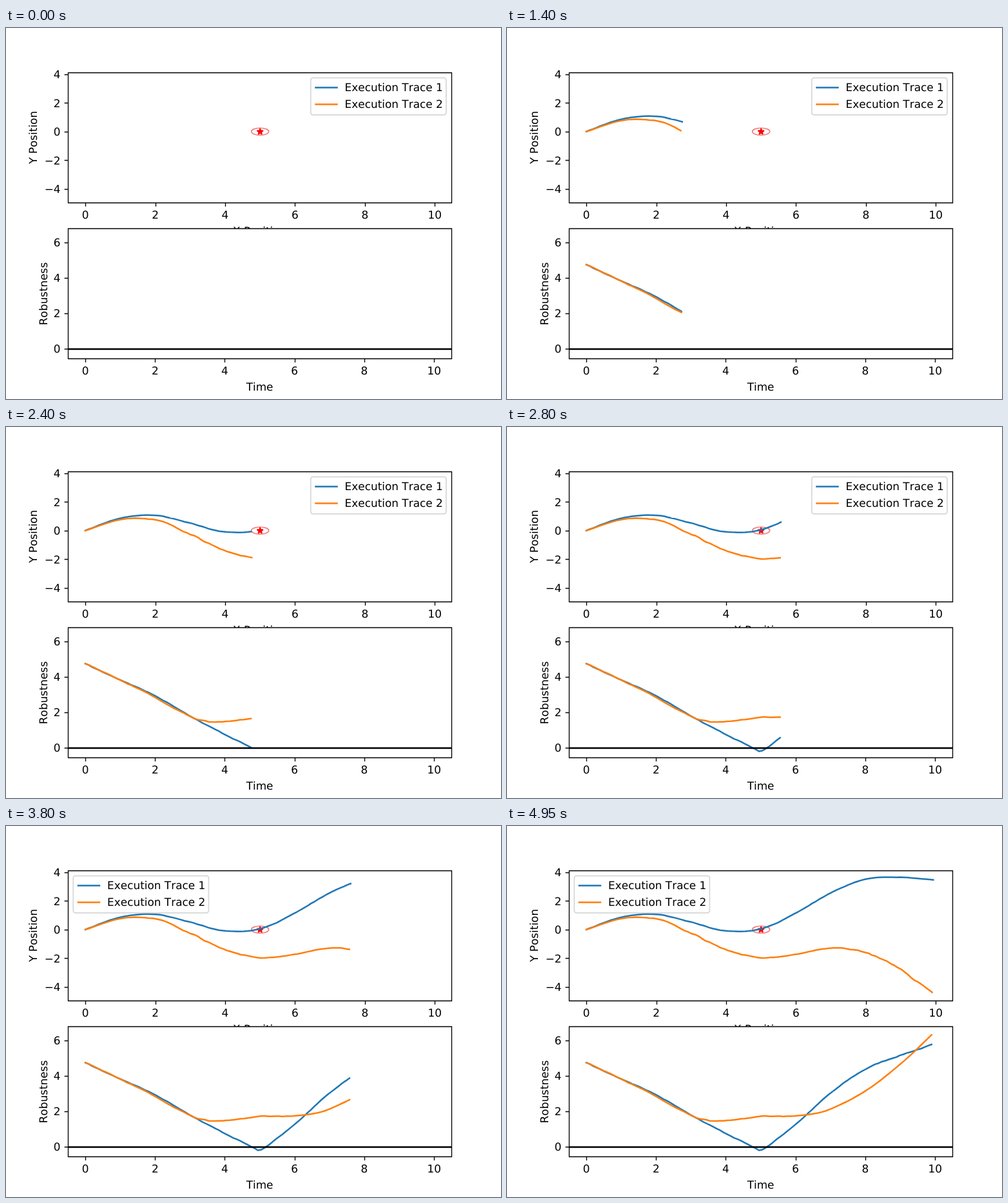
Recreate the animation shown at these times as an HTML page. Size 768 by 576 pixels, loop 5 s.

```html
<!DOCTYPE html>
<html lang="en">
<head>
<meta charset="utf-8">
<title>Execution traces</title>
<style>
html, body { margin: 0; width: 100%; height: 100%; overflow: hidden; background: #fff; }
svg { display: block; width: 768px; height: 576px; }
text {
  font: 16.9px "DejaVu Sans", sans-serif; font-kerning: none;
  fill: #000; text-rendering: geometricPrecision;
}
</style>
</head>
<body>
<svg id="stage" viewBox="0 0 768 576"></svg>
<script>
const NS = "http://www.w3.org/2000/svg";
const stage = document.getElementById("stage");
const COLORS = ["#1f77b4", "#ff7f0e"];
const LOOP = 5000, STEP = 50, COUNT = 99, DT = 10 / COUNT;
const LEFT = 96, RIGHT = 691.2, GOAL_X = 5, GOAL_R = 0.25;
const LEGEND_FLIP = 65;

// Each panel maps data to pixels: origin (x0, y0) and pixels per unit (sx, sy).
const field = { top: 69.12, bottom: 270.72, x0: 123.06, sx: 54.23, y0: 160.8, sy: 22.25 };
const chart = { top: 311.04, bottom: 512.64, x0: 123.05, sx: 54.11, y0: 498, sy: 27.5 };

function seeded(seed) {
  return () => (seed = seed * 16807 % 2147483647) / 2147483647;
}

// Smooth curve through key heights that lie one unit apart.
function spline(keys, x) {
  const last = keys.length - 1;
  const at = i => i < 0 ? 2 * keys[0] - keys[1]
    : i > last ? 2 * keys[last] - keys[last - 1] : keys[i];
  const i = Math.floor(x), u = x - i;
  const a = at(i), b = at(i + 1);
  const ma = (b - at(i - 1)) / 2, mb = (at(i + 2) - a) / 2;
  return a + u * (ma + u * (3 * (b - a) - 2 * ma - mb + u * (2 * (a - b) + ma + mb)));
}

// Robustness is the distance left to the goal's edge.
function makeTrace(keys, wobble, seed) {
  const random = seeded(seed);
  let drift = 0;
  return Array.from({ length: COUNT }, (_, k) => {
    const t = k * DT;
    if (k) drift = drift * 0.6 + (random() - 0.5) * 0.04;
    const x = t + drift;
    const y = spline(keys, t) + drift * wobble;
    return { t, x, y, r: Math.hypot(x - GOAL_X, y) - GOAL_R };
  });
}
const traces = [
  makeTrace([0, 0.86, 1.06, 0.5, -0.09, 0.05, 1.15, 2.58, 3.52, 3.65, 3.44], 0.3, 7),
  makeTrace([0, 0.76, 0.75, -0.22, -1.42, -1.96, -1.73, -1.29, -1.6, -2.84, -4.55], 1, 23)
];

function add(parent, tag, attrs, content) {
  const el = document.createElementNS(NS, tag);
  for (const name in attrs) el.setAttribute(name, attrs[name]);
  if (content !== undefined) el.textContent = content;
  parent.appendChild(el);
  return el;
}
const label = (x, y, content, anchor = "middle", extra = {}) =>
  add(stage, "text", { x, y, "text-anchor": anchor, ...extra }, content);
const rotated = (x, y, content) =>
  label(0, 0, content, "middle", { transform: `translate(${x} ${y}) rotate(-90)` });
const snap = v => Math.round(v) + 0.5;
const px = (p, x) => p.x0 + x * p.sx;
const py = (p, y) => p.y0 - y * p.sy;

function background(p, id) {
  const box = { x: LEFT, y: p.top, width: RIGHT - LEFT, height: p.bottom - p.top };
  add(add(stage, "clipPath", { id }), "rect", box);
  add(stage, "rect", { ...box, fill: "#fff" });
  return add(stage, "g", { "clip-path": `url(#${id})` });
}

function curves(group) {
  return COLORS.map(stroke => add(group, "path", {
    fill: "none", stroke, "stroke-width": 2.5,
    "stroke-linejoin": "round", "stroke-linecap": "square"
  }));
}

function frame(p, low, high) {
  const l = snap(LEFT), r = snap(RIGHT), t = snap(p.top), b = snap(p.bottom);
  let d = `M${l} ${t}H${r}V${b}H${l}Z`;
  for (let v = 0; v <= 10; v += 2) {
    d += `M${snap(px(p, v))} ${b}v5.83`;
    label(px(p, v), b + 24.6, v);
  }
  for (let v = low; v <= high; v += 2) {
    d += `M${l} ${snap(py(p, v))}h-5.83`;
    label(84.6, py(p, v) + 6.3, String(v).replace("-", "\u2212"), "end");
  }
  add(stage, "path", { d, fill: "none", stroke: "#000", "stroke-width": 1.33 });
}

function star(group, cx, cy, radius) {
  const points = Array.from({ length: 10 }, (_, i) => {
    const a = i * Math.PI / 5, r = i % 2 ? radius * 0.382 : radius;
    return `${cx + r * Math.sin(a)},${cy - r * Math.cos(a)}`;
  }).join(" ");
  add(group, "polygon", {
    points, fill: "#f00", stroke: "#f00", "stroke-width": 1.67, "stroke-linejoin": "bevel"
  });
}

function makeLegend() {
  const g = add(stage, "g", {});
  add(g, "rect", {
    x: 0, y: 0, width: 210.1, height: 57.4, rx: 3.33,
    fill: "#fff", stroke: "#ccc", "stroke-width": 1.67, opacity: 0.8
  });
  COLORS.forEach((stroke, i) => {
    const y = 15.1 + i * 26;
    add(g, "path", {
      d: `M7.7 ${y}h33`, stroke, "stroke-width": 2.5, "stroke-linecap": "square"
    });
    add(g, "text", { x: 52.8, y: y + 5.7 }, `Execution Trace ${i + 1}`);
  });
  return g;
}

// Upper panel
const fieldGroup = background(field, "fieldClip");
add(fieldGroup, "ellipse", {
  cx: px(field, GOAL_X), cy: py(field, 0), rx: GOAL_R * field.sx, ry: GOAL_R * field.sy,
  fill: "none", stroke: "#f08080", "stroke-width": 1.67
});
star(fieldGroup, px(field, GOAL_X), snap(py(field, 0)) - 0.5, 5);
const paths = curves(fieldGroup);
frame(field, -4, 4);
label(393.6, 321, "X Position");
rotated(48.4, 169.9, "Y Position");
const legend = makeLegend();

// Lower panel, covering most of the upper panel's x label
const chartGroup = background(chart, "chartClip");
const scores = curves(chartGroup);
add(chartGroup, "path", { d: `M${LEFT} ${snap(chart.y0)}H${RIGHT}`, stroke: "#000", "stroke-width": 2.5 });
frame(chart, 0, 6);
label(393.6, 563, "Time");
rotated(63.6, 412.6, "Robustness");

function outline(panel, trace, n, xKey, yKey) {
  return "M" + trace.slice(0, n + 1)
    .map(s => px(panel, s[xKey]).toFixed(2) + " " + py(panel, s[yKey]).toFixed(2))
    .join("L");
}

let shown = -1;
function draw(ms) {
  const n = Math.max(0, Math.floor((ms % LOOP) / STEP) - 1);
  if (n === shown) return;
  shown = n;
  traces.forEach((trace, i) => {
    paths[i].setAttribute("d", outline(field, trace, n, "x", "y"));
    scores[i].setAttribute("d", outline(chart, trace, n, "t", "r"));
  });
  const x = n < LEGEND_FLIP ? 472.8 : 104.3;
  legend.setAttribute("transform", `translate(${x} 77.4)`);
}

function tick() {
  draw(performance.now());
  requestAnimationFrame(tick);
}
tick();
</script>
</body>
</html>
```
